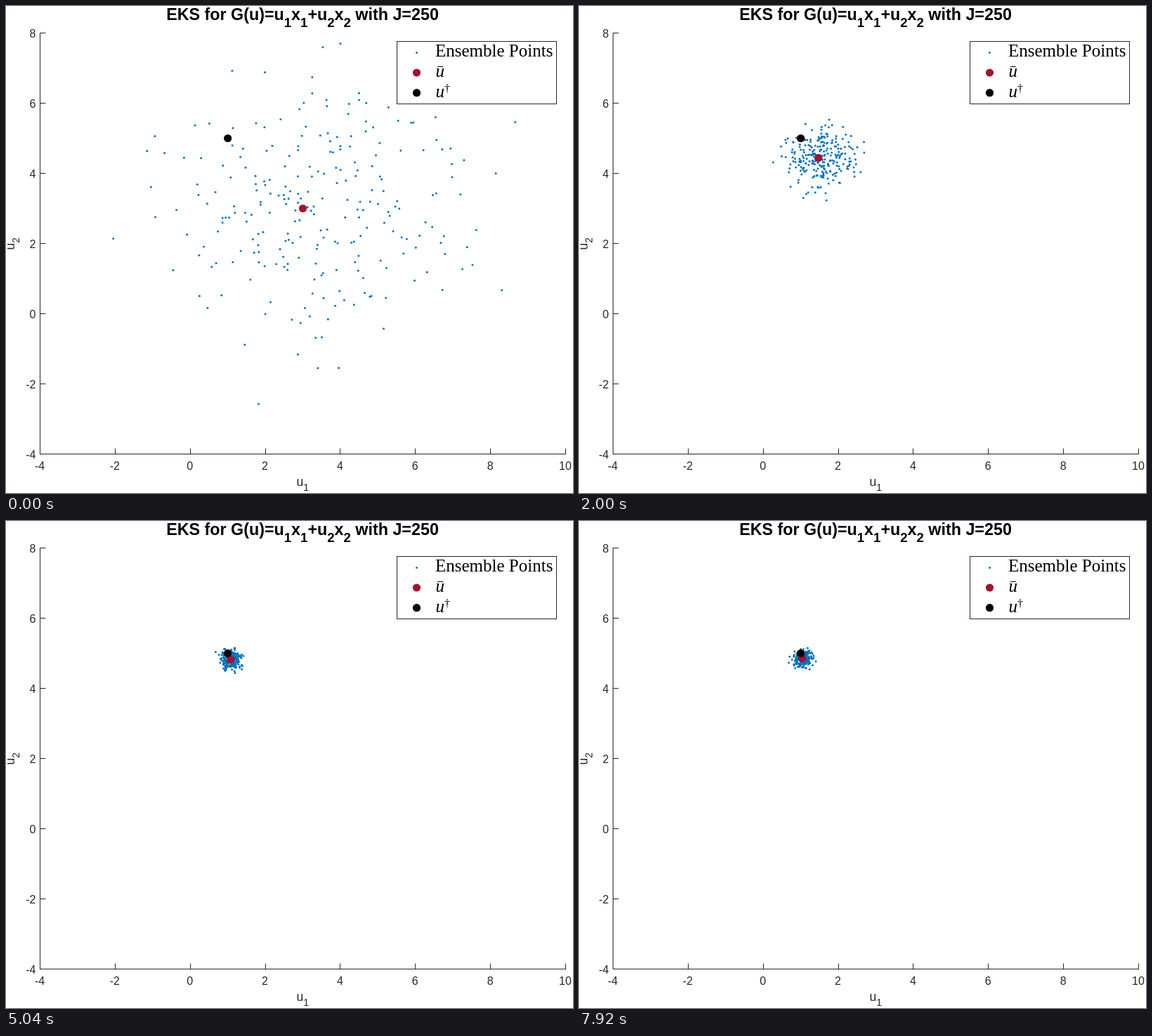
Write an HTML page with a canvas that moves like this. It is 807 by 694 pixels and loops after 8 s.

```html
<!DOCTYPE html>
<html lang="en">
<head>
<meta charset="utf-8">
<title>Ensemble scatter plot</title>
<style>
  html, body { margin: 0; width: 100%; height: 100%; overflow: hidden; background: #fff; }
  canvas, svg { position: absolute; left: 0; top: 0; width: 807px; height: 694px; }
  text { font-family: "Liberation Sans", Arial, sans-serif; fill: #262626; white-space: pre; }
  .title { font-size: 23.3px; font-weight: bold; fill: #000; }
  .title .sub { font-size: 18.6px; }
  .tick { font-size: 16px; }
  .label { font-size: 17.6px; }
  .label .sub { font-size: 14px; }
  .legend text { font-family: "Liberation Serif", "Times New Roman", serif; font-size: 25px; fill: #000; }
  .legend .var { font-style: italic; }
  .legend .sup { font-size: 16px; }
  .axis { fill: none; stroke: #262626; stroke-width: 1; }
</style>
</head>
<body>
<canvas id="plot" width="807" height="694"></canvas>
<svg viewBox="0 0 807 694">
  <text class="title" x="422" y="19.5" text-anchor="middle">EKS for G(u)=u<tspan class="sub" dy="10">1</tspan><tspan dy="-10">x</tspan><tspan class="sub" dy="10">1</tspan><tspan dy="-10">+u</tspan><tspan class="sub" dy="10">2</tspan><tspan dy="-10">x</tspan><tspan class="sub" dy="10">2</tspan><tspan dy="-10"> with J=250</tspan></text>
  <g id="axes"></g>
  <text class="label" x="413.5" y="684">u<tspan class="sub" dy="7">1</tspan></text>
  <text class="label" transform="translate(12 347.5) rotate(-90)">u<tspan class="sub" dy="7">2</tspan></text>
  <g class="legend">
    <rect x="556.5" y="50.5" width="227" height="89" fill="#fff" stroke="#262626"/>
    <circle cx="584.5" cy="66.5" r="1.5" fill="#0072bd"/>
    <circle cx="584.5" cy="95" r="5.6" fill="#a2142f"/>
    <circle cx="584.5" cy="123.7" r="5.6"/>
    <text x="611" y="72">Ensemble Points</text>
    <text class="var" x="611.5" y="101">u</text>
    <path d="M614 86.5h8" stroke="#000"/>
    <text class="var" x="611.5" y="130">u</text>
    <text class="sup" x="624" y="123">†</text>
  </g>
</svg>
<script>
const STEP = 80, STEPS = 100, COUNT = 250;
const LEFT = 48.5, BOTTOM = 638.5, UNIT_X = 748 / 14, UNIT_Y = 50;
const START = [3, 3], GOAL = [1.03, 4.86], TRUTH = [1, 5];
const MEAN_DECAY = 0.942, DECAY = 0.942;
const INITIAL = 2, FINAL = 0.12;

// The widest members set the reach of the cloud.
const extremes = [
  [8.66, 5.46], [8.3, 0.67], [-2.05, 2.14], [1.82, -2.57],
  [4, 7.7], [8.14, 4], [7.25, 1.27], [3.4, -1.55]
];

const toX = u => LEFT + (u + 4) * UNIT_X;
const toY = u => BOTTOM - (u + 4) * UNIT_Y;

let seed = 250;
function random() {
  seed = (seed + 0x6d2b79f5) | 0;
  let h = Math.imul(seed ^ (seed >>> 15), seed | 1);
  h ^= h + Math.imul(h ^ (h >>> 7), h | 61);
  return ((h ^ (h >>> 14)) >>> 0) / 4294967296;
}

const gauss = () =>
  Math.sqrt(-2 * Math.log(1 - random())) * Math.cos(2 * Math.PI * random());

// Normal offset from the mean, limited to a plausible radius.
function sample() {
  for (;;) {
    const p = [INITIAL * gauss(), INITIAL * gauss()];
    if (Math.hypot(...p) < 2.4 * INITIAL) return p;
  }
}

const meanAt = k => GOAL.map((g, i) => g + (START[i] - g) * MEAN_DECAY ** k);

// Offsets shrink each step while noise holds the final spread.
function simulate() {
  const kick = FINAL * Math.sqrt(1 - DECAY * DECAY);
  let cloud = extremes.map(p => p.map((v, i) => v - START[i]));
  while (cloud.length < COUNT) cloud.push(sample());
  const states = [cloud];
  while (states.length < STEPS) {
    cloud = cloud.map(p => p.map(v => v * DECAY + kick * gauss()));
    states.push(cloud);
  }
  return states;
}

function buildAxes() {
  const snap = v => Math.floor(v) + 0.5;
  let path = `M${LEFT} 38V${BOTTOM}H797`, labels = "";
  for (let v = -4; v <= 10; v += 2) {
    const x = toX(v), y = toY(v);
    path += `M${snap(x)} ${BOTTOM}v-8`;
    labels += `<text class="tick" x="${x - 0.5}" y="661" text-anchor="middle">${v}</text>`;
    if (v > 8) continue;
    path += `M${LEFT} ${y}h8`;
    labels += `<text class="tick" x="42.5" y="${y + 6}" text-anchor="end">${v}</text>`;
  }
  document.getElementById("axes").innerHTML = `<path class="axis" d="${path}"/>${labels}`;
}

const ctx = document.getElementById("plot").getContext("2d");
const states = simulate();
let shown = -1;

function disc([u1, u2], r, color) {
  ctx.fillStyle = color;
  ctx.beginPath();
  ctx.arc(toX(u1), toY(u2), r, 0, 2 * Math.PI);
  ctx.fill();
}

function draw(k) {
  const mean = meanAt(k);
  ctx.clearRect(0, 0, 807, 694);
  for (const p of states[k]) disc([mean[0] + p[0], mean[1] + p[1]], 1.5, "#0072bd");
  disc(mean, 5.6, "#a2142f");
  disc(TRUTH, 5.6, "#000");
}

function tick() {
  const k = Math.floor(performance.now() / STEP) % STEPS;
  if (k !== shown) draw(shown = k);
  requestAnimationFrame(tick);
}

buildAxes();
tick();
</script>
</body>
</html>
```
